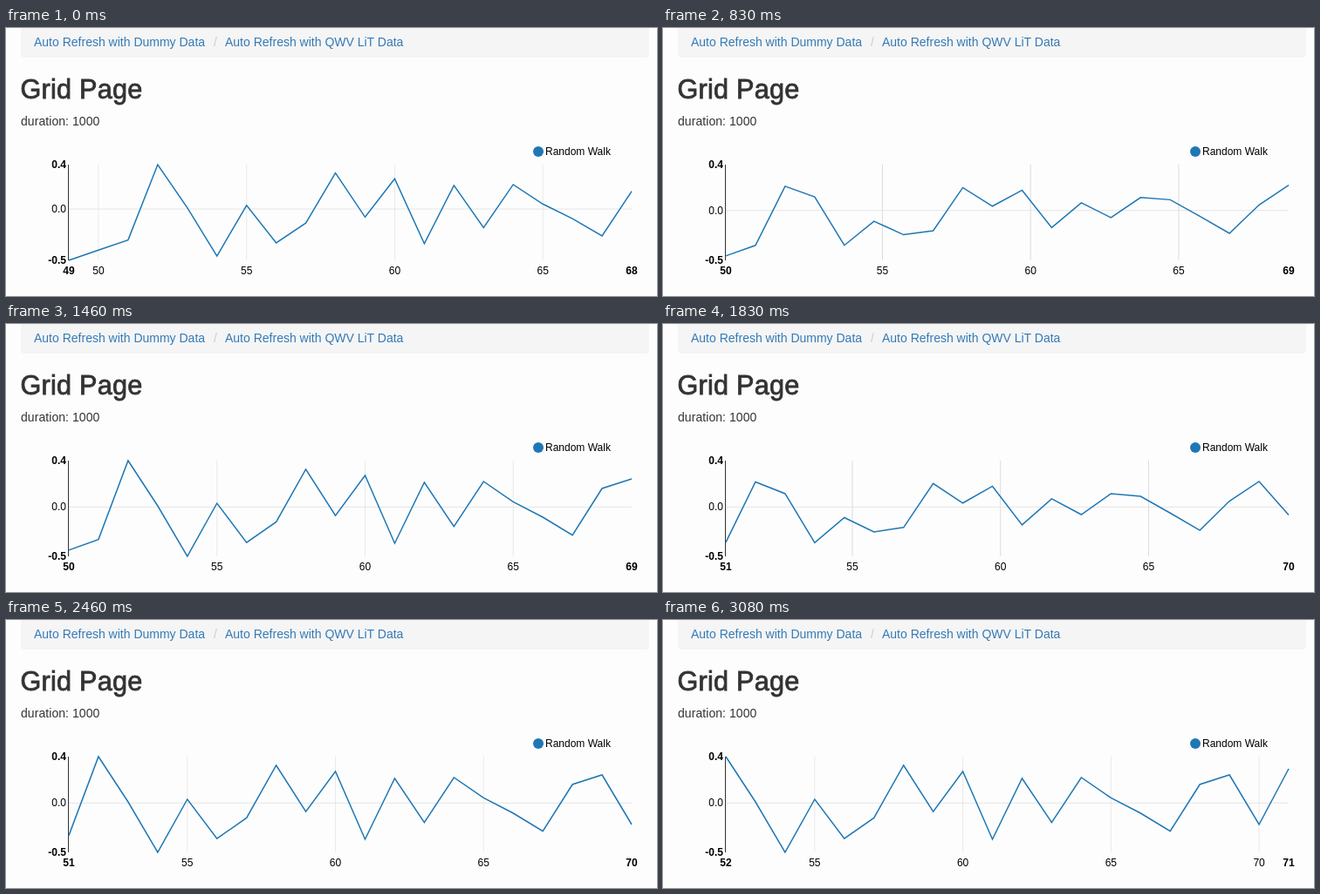
Write an HTML page that moves like this. It is 746 by 308 pixels and loops after 3.12 s.

```html
<!DOCTYPE html>
<html lang="en">
<head>
<meta charset="utf-8">
<title>Grid Page</title>
<style>
  html, body { margin: 0; width: 100%; height: 100%; overflow: hidden; background: #fdfdfd; }
  svg { display: block; width: 746px; height: 308px; font: 12px "Liberation Sans", Arial, sans-serif; }
  .page { font-size: 14px; fill: #333; }
  .title { font-size: 30.6px; letter-spacing: .25px; stroke: #333; stroke-width: .8px; }
  .note { letter-spacing: .06px; }
  .link { fill: #337ab7; }
  .slash { fill: #ccc; }
  .mid { text-anchor: middle; }
  .end { text-anchor: end; }
  .bold { font-weight: bold; }
  .grid { stroke: #dcdcdc; }
  .zero { stroke: #e5e5e5; }
  .axis { stroke: #333; }
  .line { fill: none; stroke: #1f77b4; stroke-width: 1.5px; }
</style>
</head>
<body>
<svg viewBox="0 0 746 308">
  <rect x="17" y="-6" width="720" height="40" rx="4" fill="#f5f5f5"/>
  <g class="page">
    <text class="link" x="32" y="21">Auto Refresh with Dummy Data</text>
    <text class="slash" x="238" y="21">/</text>
    <text class="link" x="251" y="21">Auto Refresh with QWV LiT Data</text>
    <text class="title" x="16.5" y="81">Grid Page</text>
    <text class="note" x="17" y="112">duration: 1000</text>
  </g>
  <circle cx="610" cy="142" r="6" fill="#1f77b4"/>
  <text x="618" y="146">Random Walk</text>
  <g id="ticks"></g>
  <line class="zero" id="zero" x1="72" x2="717"/>
  <text class="end" id="zeroLabel" x="69">0.0</text>
  <line class="axis" x1="71.5" x2="71.5" y1="157" y2="267"/>
  <text class="end bold" id="top" x="69" y="161"></text>
  <text class="end bold" id="bottom" x="69" y="271"></text>
  <text class="mid bold" id="first" x="72" y="283"></text>
  <text class="mid bold" id="last" x="717" y="283"></text>
  <polyline class="line" id="line"/>
</svg>
<script>
  const LOOP = 3120, FRAME = 125 / 3;
  const FIRST = 49, COUNT = 20;
  const UPDATE = 541, INTERVAL = 996, DURATION = 500;
  const LEFT = 72, TOP = 157, HEIGHT = 110, STEP = 645 / (COUNT - 1);

  // Random walk samples in thousandths, starting at x = FIRST
  const samples = [-494, -396, -298, 427, 11, -453, 35, -326, -136, 347, -78, 291,
    -333, 227, -179, 235, 48, -93, -259, 171, 259, -197, 315];

  const el = id => document.getElementById(id);
  const mix = (a, b, p) => a + (b - a) * p;
  const ease = t => t < .5 ? 4 * t ** 3 : 1 - 4 * (1 - t) ** 3;

  function makeView(shift) {
    const values = samples.slice(shift, shift + COUNT);
    const max = Math.max(...values), min = Math.min(...values);
    const y = v => TOP + (max - v) / (max - min) * HEIGHT;
    const start = FIRST + shift;
    return {
      start, max, min,
      end: start + COUNT - 1,
      zero: y(0),
      ys: values.map(y),
      x: n => LEFT + (n - start) * STEP,
      shows: n => n > start && n < start + COUNT - 1
    };
  }
  const views = [0, 1, 2, 3].map(makeView);

  const ticks = [50, 55, 60, 65, 70].map(n => {
    const g = document.createElementNS('http://www.w3.org/2000/svg', 'g');
    g.innerHTML = `<line class="grid" y1="${TOP}" y2="${TOP + HEIGHT}"/>` +
      `<text class="mid" y="283">${n}</text>`;
    el('ticks').append(g);
    return { n, g, rule: g.firstChild };
  });

  function draw(time) {
    const step = Math.max(0, Math.floor((time - UPDATE) / INTERVAL) + 1);
    const now = views[step], old = views[Math.max(0, step - 1)];
    const elapsed = time - UPDATE - (step - 1) * INTERVAL;
    const p = step ? ease(Math.min(1, elapsed / DURATION)) : 1;

    for (const { n, g, rule } of ticks) {
      g.setAttribute('transform', `translate(${mix(old.x(n), now.x(n), p)} 0)`);
      g.setAttribute('opacity', now.shows(n) ? (old.shows(n) ? 1 : p) : 0);
      rule.setAttribute('opacity', p < 1 ? 1 : .6);
    }

    const zero = mix(old.zero, now.zero, p);
    el('zero').setAttribute('y1', zero);
    el('zero').setAttribute('y2', zero);
    el('zeroLabel').setAttribute('y', zero + 4);

    el('top').textContent = (now.max / 1000).toFixed(1);
    el('bottom').textContent = (now.min / 1000).toFixed(1);
    el('first').textContent = now.start;
    el('last').textContent = now.end;
    el('line').setAttribute('points',
      now.ys.map((y, i) => `${LEFT + i * STEP},${mix(old.ys[i], y, p)}`).join(' '));
  }

  function tick() {
    const time = performance.now() % LOOP;
    draw(Math.floor((time + 5) / FRAME) * FRAME);
    requestAnimationFrame(tick);
  }
  tick();
</script>
</body>
</html>
```
